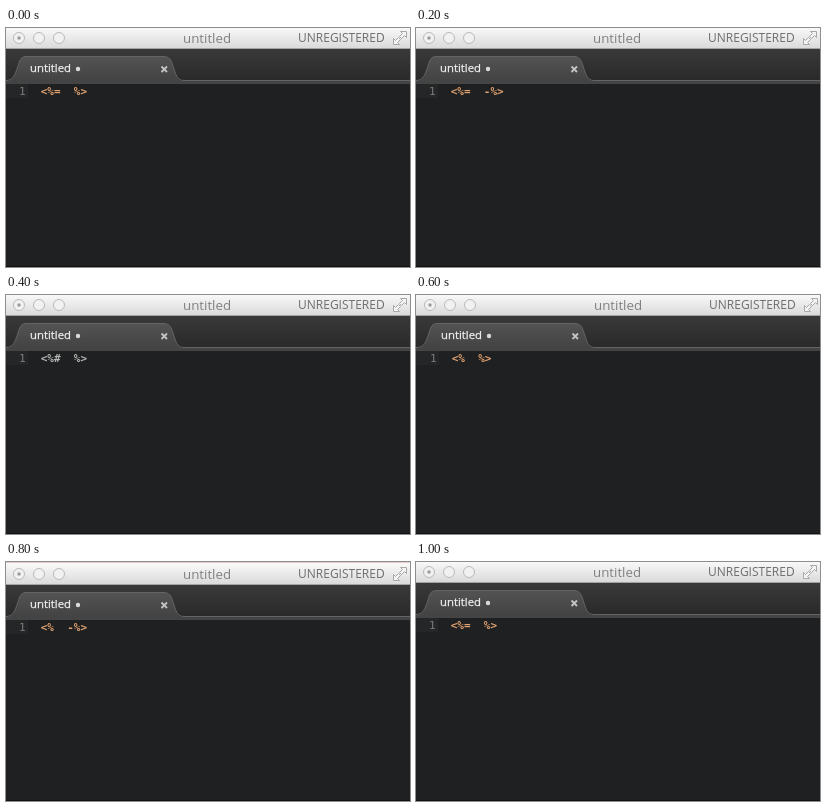
These frames come from a looping animation (404x239 px, 1.2 s). An HTML page:

```html
<!DOCTYPE html>
<html lang="en">
<head>
<meta charset="utf-8">
<style>
  html, body { margin: 0; width: 100%; height: 100%; overflow: hidden; background: #1e2021; }
  svg { display: block; width: 404px; height: 239px; }
  text { font-family: "Open Sans", "DejaVu Sans", sans-serif; white-space: pre; }
  .mono { font: 11px "DejaVu Sans Mono", monospace; }
  #code { font-weight: bold; }
</style>
</head>
<body>
<svg viewBox="0 0 404 239">
  <defs>
    <linearGradient id="title" x2="0" y2="1">
      <stop stop-color="#f8f8f8"/><stop offset="1" stop-color="#d9d9d9"/>
    </linearGradient>
    <linearGradient id="bar" x2="0" y2="1">
      <stop stop-color="#393939"/><stop offset="1" stop-color="#292929"/>
    </linearGradient>
    <linearGradient id="tab" x2="0" y2="1">
      <stop stop-color="#535353"/><stop offset="1" stop-color="#434343"/>
    </linearGradient>
  </defs>
  <rect width="404" height="3" fill="#e4cccc"/>
  <g id="window">
    <rect x="-2" y="-1" width="408" height="1" fill="#f8f8f8"/>
    <rect x="-2" width="408" height="240" fill="#1e2021"/>
    <rect x="-2" width="408" height="21" fill="url(#title)"/>
    <rect x="-2" y="20" width="408" height="1" fill="#a2a2a2"/>
    <g fill="#f1f1f1" stroke="#bababa">
      <circle cx="13" cy="10" r="5.5"/>
      <circle cx="33" cy="10" r="5.5"/>
      <circle cx="53" cy="10" r="5.5"/>
    </g>
    <circle cx="13" cy="10" r="1.7" fill="#9a9a9a"/>
    <text x="177" y="15" font-size="13.3" fill="#808080">untitled</text>
    <text x="292" y="14" font-size="12" fill="#6d6d6d">UNREGISTERED</text>
    <path d="M394.5 3.5h6v6l-2-2-3 3-2-2 3-3zM393.5 16.5h-6v-6l2 2 3-3 2 2-3 3z" fill="#f4f4f4" stroke="#a8a8a8"/>

    <rect x="-2" y="21" width="408" height="32" fill="url(#bar)"/>
    <path d="M0 53C7 53 9 47 12 38C14 31 15 28.5 21 28.5H157C163 28.5 165 31 167 38C170 47 171 53 178 53Z" fill="url(#tab)"/>
    <path d="M-2 52.5H0C7 52.5 9 47 12 38C14 31 15 28.5 21 28.5H157C163 28.5 165 31 167 38C170 47 171 52.5 178 52.5H406" fill="none" stroke="#646464"/>
    <rect x="-2" y="53" width="408" height="3" fill="#444"/>
    <text x="24" y="44" font-size="11.35" font-weight="500" fill="#f0f0f0" stroke="#f0f0f0" stroke-width=".25">untitled</text>
    <circle cx="72" cy="41" r="2.2" fill="#dadada"/>
    <path d="M155.5 38.5l5.5 5.5m0-5.5l-5.5 5.5" stroke="#c4c4c4" stroke-width="1.8"/>

    <rect x="-2" y="56" width="24" height="14" fill="#242627"/>
    <text class="mono" x="13" y="67" fill="#7b7d7b">1</text>
    <text class="mono" id="code" x="34.7" y="67"></text>
  </g>
  <rect y="238" width="404" height="1" fill="#111"/>
</svg>
<script>
  const ORANGE = '#e0a070', GREY = '#b5b7b4', STEP = 200;
  // text, colour, window offset
  const states = [
    ['<%=  %>', ORANGE, 0, 0],
    ['<%=  -%>', ORANGE, 0, 0],
    ['<%#  %>', GREY, 0, 0],
    ['<%  %>', ORANGE, 1, 0],
    ['<%  -%>', ORANGE, 0, 2],
    ['<%=  %>', ORANGE, 0, 0]
  ];
  const code = document.getElementById('code');
  const win = document.getElementById('window');

  function draw() {
    const i = Math.floor(performance.now() / STEP) % states.length;
    const [text, colour, dx, dy] = states[i];
    code.textContent = text;
    code.setAttribute('fill', colour);
    win.setAttribute('transform', `translate(${dx} ${dy})`);
    requestAnimationFrame(draw);
  }
  draw();
</script>
</body>
</html>
```
